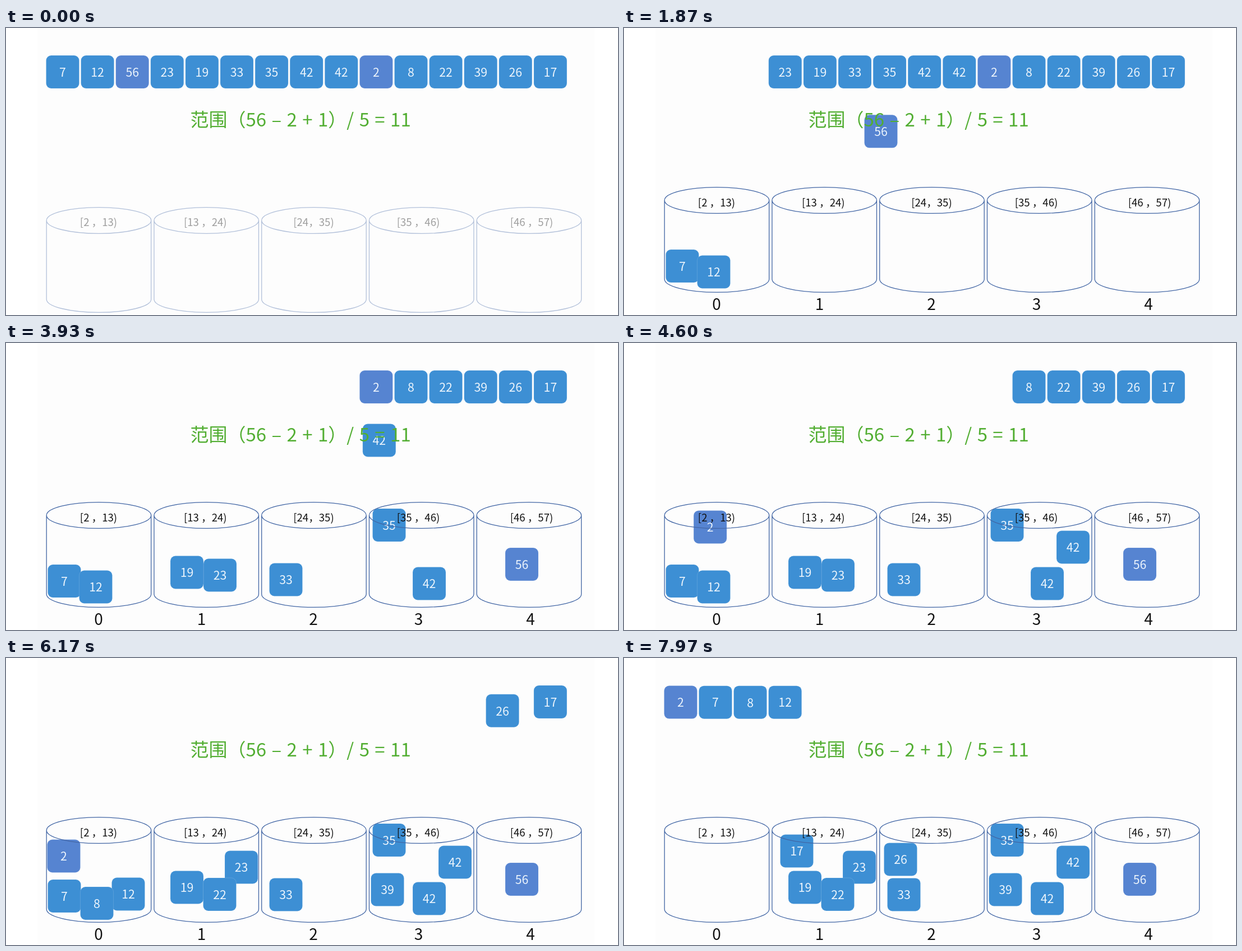
An HTML page for the animation above (8 s loop, 1091 by 513 pixels).

```html
<!DOCTYPE html>
<html lang="zh-CN">
<head>
<meta charset="utf-8">
<title>Bucket sort</title>
<style>
  html, body { margin: 0; width: 100%; height: 100%; overflow: hidden; background: #fff; }
  svg { display: block; width: 1091px; height: 513px; font-family: "Noto Sans CJK SC", "Noto Sans CJK", sans-serif; }
  .num { font-size: 21.3px; fill: #edf5fc; text-anchor: middle; }
  .box { stroke: #fff; stroke-opacity: .14; }
  .formula { font-size: 33px; word-spacing: 2px; fill: #52ae32; }
  .bucket { fill: none; stroke: #4165a4; stroke-width: 1.3; }
  .range { font-size: 18.6px; fill: #111; text-anchor: middle; }
  .index { font-size: 28px; fill: #111; text-anchor: middle; }
</style>
</head>
<body>
<svg id="stage" viewBox="0 0 1091 513">
  <rect x="56" width="993" height="511" fill="#fdfdfd"/>
  <g id="items"></g>
  <g id="buckets"></g>
  <text class="formula" x="328.5" y="175.7">范围（56 – 2 + 1）/ 5 = 11</text>
</svg>
<script>
const LOOP = 8000, RISE = 700, FLY = 486, COLLECT = 7067;
const SIZE = 59, ROW_Y = 78.5;
const slotX = i => 101 + 62.1 * i;

// Each item flies to its resting centre once the one before has landed;
// "early" is the share of that flight it overlaps.
// "pushed" names the item that later shoves it aside, and where to.
const ITEMS = [
  { value: 7, at: [104, 425.5] },
  { value: 12, at: [160, 436], pushed: { by: 8, at: [218, 422] } },
  { value: 56, at: [919.5, 395.5] },
  { value: 23, at: [381.5, 415], pushed: { by: 22, at: [419.5, 374] } },
  { value: 19, at: [322.5, 410], early: .76 },
  { value: 33, at: [499, 423] },
  { value: 35, at: [683, 325.5] },
  { value: 42, at: [754.5, 430], early: 1 },
  { value: 42, at: [800.5, 365] },
  { value: 2, at: [103, 354] },
  { value: 8, at: [162, 438.5] },
  { value: 22, at: [381, 422.5] },
  { value: 39, at: [680, 414] },
  { value: 26, at: [493, 360], early: .15 },
  { value: 17, at: [308, 345], early: .15 }
];

// range, its centre, centre of the index below
const BUCKETS = [
  ["[2 ，13)", 165, 165],
  ["[13 ，24)", 355.3, 348.5],
  ["[24，35)", 548.5, 548],
  ["[35 ，46)", 735, 735.5],
  ["[46 ，57)", 937, 935]
];

const itemLayer = document.getElementById("items");
const bucketLayer = document.getElementById("buckets");

function add(parent, tag, attrs, text = "") {
  const el = document.createElementNS(parent.namespaceURI, tag);
  for (const key in attrs) el.setAttribute(key, attrs[key]);
  el.textContent = text;
  return parent.appendChild(el);
}

function planMoves() {
  let landed = RISE;
  for (const item of ITEMS) {
    item.start = landed - FLY * (item.early || 0);
    landed = item.start + FLY;
    item.moves = [{ start: item.start, end: landed, at: item.at }];
  }
  for (const { moves, pushed } of ITEMS.filter(item => item.pushed)) {
    const { start } = ITEMS.find(item => item.value === pushed.by);
    moves.push({ start: start + FLY * .4, end: start + FLY, at: pushed.at });
  }
  ITEMS.filter(item => item.value < 13)
    .sort((a, b) => a.value - b.value)
    .forEach((item, i) => item.moves.push({ start: COLLECT, end: LOOP, at: [slotX(i), ROW_Y] }));
}

function drawItem(item, i) {
  item.home = [slotX(i), ROW_Y];
  item.el = add(itemLayer, "g", {});
  const extreme = item.value === 2 || item.value === 56;
  add(item.el, "rect", {
    class: "box", x: -SIZE / 2, y: -SIZE / 2, width: SIZE, height: SIZE, rx: 9,
    fill: extreme ? "#5684d1" : "#3d8fd4"
  });
  add(item.el, "text", { class: "num", y: 8.3 }, item.value);
}

function drawBucket([range, rangeX, indexX], i) {
  const left = 72.2 + 191.75 * i, right = left + 186.5;
  const arc = "A93.25 23.4 0 0 ";
  add(bucketLayer, "path", {
    class: "bucket",
    d: `M${left} 308${arc}1 ${right} 308${arc}1 ${left} 308V449${arc}0 ${right} 449V308`
  });
  add(bucketLayer, "text", { class: "range", x: rangeX, y: 318.5 }, range);
  add(bucketLayer, "text", { class: "index", x: indexX, y: 504 }, i);
}

const clamp = u => Math.min(1, Math.max(0, u));
const ease = u => u < .5 ? 2 * u * u : 1 - 2 * (1 - u) ** 2;

function place({ el, home, moves }, t) {
  let [x, y] = home;
  for (const { start, end, at } of moves) {
    const p = ease(clamp((t - start) / (end - start)));
    x += (at[0] - x) * p;
    y += (at[1] - y) * p;
  }
  el.setAttribute("transform", `translate(${x.toFixed(2)} ${y.toFixed(2)})`);
}

function draw(t) {
  for (const item of ITEMS) place(item, t);
  const left = 1 - clamp(t / RISE);
  bucketLayer.setAttribute("transform", `translate(0 ${36 * left})`);
  bucketLayer.setAttribute("opacity", 1 - .6 * left);
}

planMoves();
ITEMS.forEach(drawItem);
BUCKETS.forEach(drawBucket);

const began = performance.now();
function tick() {
  draw((performance.now() - began) % LOOP);
  requestAnimationFrame(tick);
}
tick();
</script>
</body>
</html>
```
